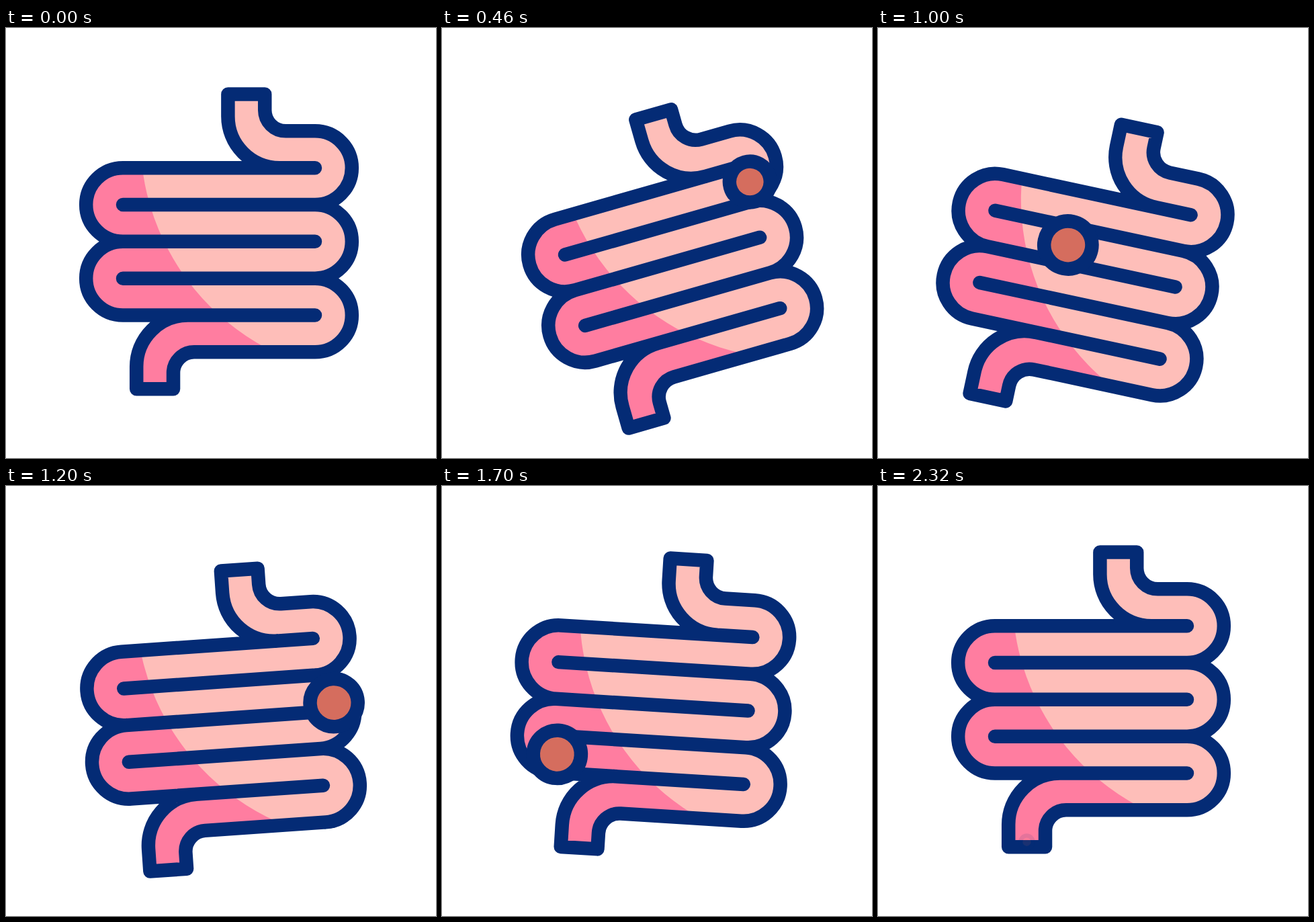
Write an HTML page that moves like this. It is 640 by 640 pixels and loops after 2400 ms.

```html
<!DOCTYPE html>
<html lang="en">
<head>
<meta charset="utf-8">
<title>Intestine</title>
<style>
  html, body { margin: 0; width: 100%; height: 100%; overflow: hidden; background: #fff; }
  svg { display: block; width: 100%; height: 100%; }
  .tube { fill: none; stroke-width: 54.8; }
  #outline { fill: none; stroke: #042b75; stroke-width: 20.5; stroke-linecap: round; stroke-linejoin: round; }
</style>
</head>
<body>
<svg viewBox="0 0 640 640">
  <defs>
    <clipPath id="light"><circle cx="554.6" cy="163.7" r="354.6"/></clipPath>
    <path id="track"/>
  </defs>
  <g id="body">
    <use href="#track" class="tube" stroke="#ff7da0"/>
    <g clip-path="url(#light)"><use href="#track" class="tube" stroke="#febeb9"/></g>
    <path id="outline"/>
    <circle id="ball" fill="#d56d5e" stroke="#042b75"/>
  </g>
</svg>
<script>
const LOOP = 2400, LAST = 2320, BEAT = 358;
const TOP = 98.5, LEFT = 174, RIGHT = 460, GAP = 54.83;
const [body, track, outline, ball] =
  ['body', 'track', 'outline', 'ball'].map(id => document.getElementById(id));

function set(el, attrs) {
  for (const name in attrs) el.setAttribute(name, attrs[name]);
}

const row = n => TOP + n * GAP;
const side = n => n % 2 ? RIGHT : LEFT;
const bend = (n, r) => `a${r} ${r} 0 0 ${n % 2} 0 ${2 * r}`;

// Open end of the tube: dir is -1 for the upper one, 1 for the lower one
function opening(x, n, dir) {
  const R = 76.6, r = 31, sweep = dir < 0 ? 1 : 0;
  return `M${x} ${row(n)}a${R} ${R} 0 0 ${sweep} ${-R} ${dir * R}V${row(n + 2 * dir)}h${GAP}` +
    `v${dir * (r - GAP)}a${r} ${r} 0 0 ${1 - sweep} ${r} ${-dir * r}H${RIGHT}`;
}

function buildTube() {
  let middle = `M358 ${TOP}v28.25a54 54 0 0 0 54 54`;
  let edges = opening(407, 2, -1) + opening(270.8, 6, 1);
  for (let n = 1; n <= 5; n++) {
    middle += `H${side(n)}${bend(n, GAP / 2)}`;
    edges += `M${side(n)} ${row(n)}${bend(n, GAP)}M${LEFT} ${row(n + 1)}H${RIGHT}`;
  }
  set(track, { d: middle + 'H275.4a54 54 0 0 0 -54 54v28.25' });
  set(outline, { d: edges });
}

const clamp = u => Math.min(1, Math.max(0, u));
const ease = u => u * u * (3 - 2 * u);
const ramp = (t, from, to) => ease(clamp((t - from) / (to - from)));

// Smooth curve through [time, value] points, flat at every extreme
function curve(...pts) {
  const slope = i => (pts[i + 1][1] - pts[i][1]) / (pts[i + 1][0] - pts[i][0]);
  const tangents = pts.map((p, i) => {
    if (!i || i === pts.length - 1) return 0;
    const a = slope(i - 1), b = slope(i);
    return a * b <= 0 ? 0 : 2 * a * b / (a + b);
  });
  return t => {
    let i = 0;
    while (i < pts.length - 2 && t > pts[i + 1][0]) i++;
    const [t0, a] = pts[i], [t1, b] = pts[i + 1], d = t1 - t0;
    const u = clamp((t - t0) / d), v = 1 - u;
    return a + (b - a) * ease(u) + d * u * v * (tangents[i] * v - tangents[i + 1] * u);
  };
}

const bounce = curve(...[0, 53.5, -35, 48, -19.5, 13, 0].map((y, i) => [i * BEAT, y]));
const tilt = curve([0, 0], [371, -18.5], [905, 15.5], [1310, -8.2], [1480, -2.6], [1620, 7.2], [1780, 0]);
const travel = curve([0, 10], [460, 238], [820, 561], [1480, 1198], [1700, 1369], [LAST, 2026]);

function draw(now) {
  const t = Math.min(now % LOOP, LAST);
  const { x, y } = track.getPointAtLength(travel(t));
  const r = 4 + 31.6 * ramp(t, 0, 620) - 26.3 * ramp(t, 2040, LAST);
  const opacity = ramp(t, 0, 120) - 0.9 * ramp(t, 2180, LAST);
  set(body, { transform: `translate(0 ${bounce(t)}) rotate(${tilt(t)} 317 250)` });
  set(ball, { cx: x, cy: y, r, 'stroke-width': Math.min(20.5, r * 0.67), opacity });
}

buildTube();
const start = performance.now();
(function tick() {
  draw(performance.now() - start);
  requestAnimationFrame(tick);
})();
</script>
</body>
</html>
```
